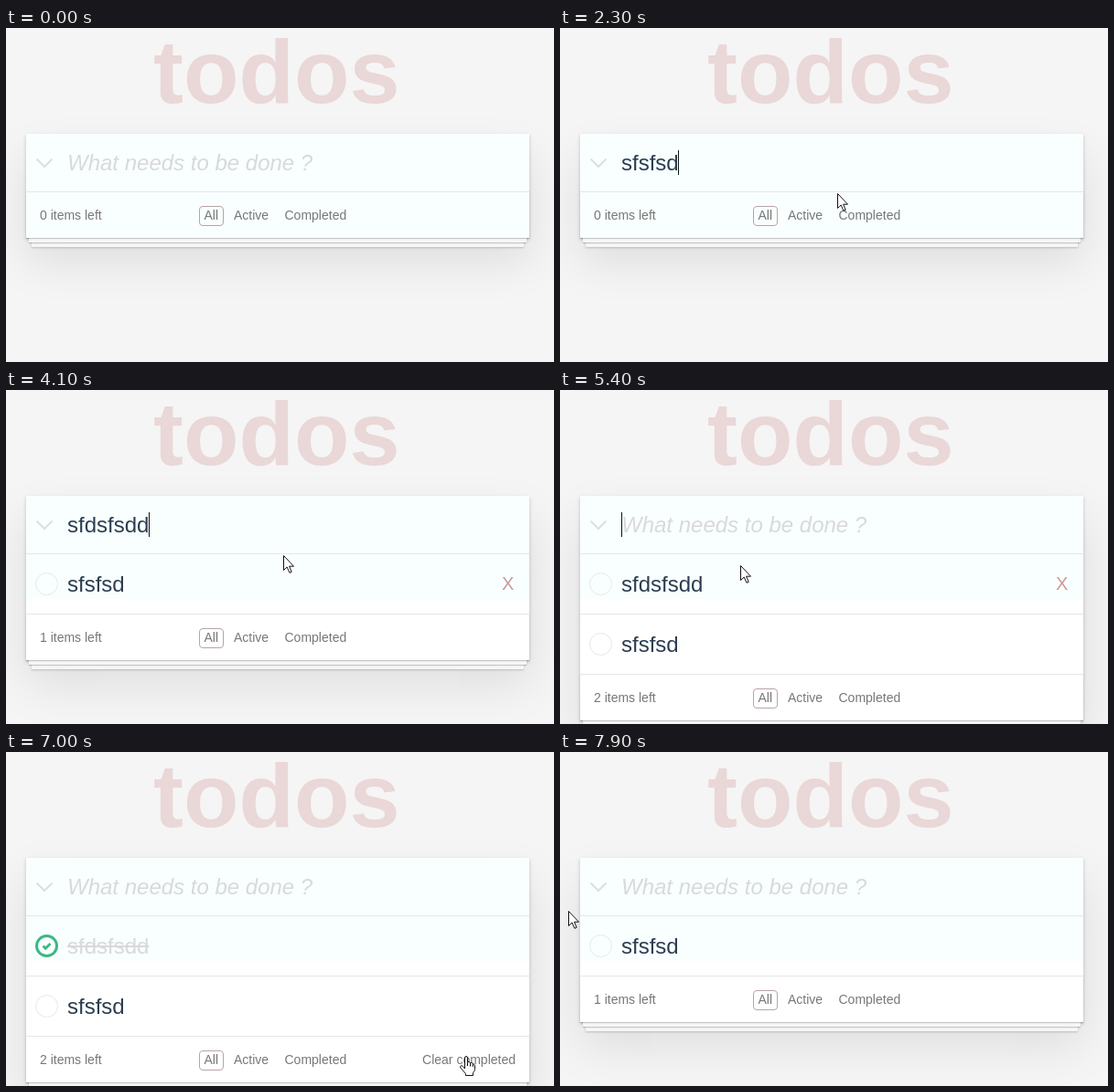
These frames come from a looping animation (599 px wide and 366 px high, 8 s). An HTML page:

```html
<!DOCTYPE html>
<html lang="en">
<head>
<meta charset="utf-8">
<title>todos</title>
<style>
html, body { margin: 0; width: 100%; height: 100%; overflow: hidden; background: #f5f5f5; }
#stage { position: relative; width: 599px; height: 366px; overflow: hidden; background: #f5f5f5;
  font: 14px "Liberation Sans", Arial, sans-serif; color: #777; }
#stage * { position: absolute; box-sizing: border-box; margin: 0; white-space: pre; }
#stage h1 { left: 161px; top: -9px; font-size: 99px; line-height: normal; color: rgba(175, 47, 47, .15); }
#card { left: 22px; top: 116px; width: 550px;
  background: linear-gradient(#f9ffff 114px, #fff 114px);
  box-shadow: 0 2px 4px rgba(0, 0, 0, .2), 0 25px 50px rgba(0, 0, 0, .1); }
#stack { left: 0; bottom: 0; width: 550px; height: 50px;
  box-shadow: 0 1px 1px rgba(0, 0, 0, .2), 0 8px 0 -3px #f6f6f6, 0 9px 1px -3px rgba(0, 0, 0, .2),
    0 16px 0 -6px #f6f6f6, 0 17px 2px -6px rgba(0, 0, 0, .2); }
.big { left: 45px; font-size: 24px; color: #2c3e50; }
#hint { top: 18px; font-style: italic; color: #d9d9d9; }
#typed { top: 18px; }
#caret { top: 18px; width: 1px; height: 27px; background: #111; }
#list { left: 0; top: 0; }
.row, #footer { left: 0; width: 550px; height: 66px; border-top: 1px solid #e6e6e6; }
.row .big { top: 19px; }
.kill { left: 520px; top: 21px; font-size: 20px; color: #cc9a9a; }
#footer { height: 51px; }
#footer span { top: 17px; }
#footer .on { left: 189px; top: 15px; width: 27px; height: 22px; border: 1px solid #b8a4a4; border-radius: 4px; }
svg { left: 0; top: 0; overflow: visible; fill: none; }
.row svg { left: 9px; top: 19px; }
</style>
</head>
<body>
<div id="stage">
  <h1>todos</h1>
  <div id="card">
    <div id="stack"></div>
    <svg width="550" height="64"><path d="M11.5 27.5 20 36 28.5 27.5" stroke="#dedede" stroke-width="2"/></svg>
    <div id="hint" class="big">What needs to be done ?</div>
    <div id="typed" class="big"></div>
    <div id="caret"></div>
    <div id="list"></div>
    <div id="footer">
      <span id="count" style="left:15px"></span>
      <i class="on"></i>
      <span style="left:194.5px">All</span>
      <span style="left:227px">Active</span>
      <span style="left:282.5px">Completed</span>
      <span id="clear" style="right:15px">Clear completed</span>
    </div>
  </div>
  <svg id="mouse" width="20" height="24" stroke="#111" stroke-linejoin="round">
    <path id="beam" d="M-3-8.5h2.5L0-8 .5-8.5H3M0-8V8M-3 8.5h2.5L0 8 .5 8.5H3"/>
    <path id="arrow" fill="#fff" d="M.5.5V16.5L4.2 13 7 19.3 9.2 18.3 6.6 12.2H11.5Z"/>
    <g id="hand">
      <path fill="#fff" d="M5.5 14V2.2Q5.5.5 7 .5T8.5 2.2V7.5Q9 6.3 10.3 6.6 11.4 6.8 11.5 8 12.2 7 13.4 7.5 14.3 7.9 14.3 9 15.2 8.6 15.9 9.4 16.5 10 16.5 11V14.5Q16.5 16.5 14.5 18.5V21.5H6.5V19.5L1 13.2Q0 11.8 1.2 10.9 2.3 10.3 3.4 11.4Z"/>
      <path d="M8.5 7.5V11M11.5 8V11.5M14.3 9V12"/>
    </g>
  </svg>
</div>
<script>
const LOOP = 8000, CHECK = 6200, CLEAR = 7300;
const $ = id => document.getElementById(id);

// time, x, y, kind
const mouse = [
  [0, 0, 0, ''],
  [200, 499, 151, 'beam'], [300, 420, 157, 'beam'], [400, 310, 160, 'beam'], [500, 230, 150, 'beam'],
  [600, 180, 136, 'beam'], [700, 162, 130, 'beam'], [800, 150, 142, 'beam'], [900, 144, 151, 'beam'],
  [1100, 235, 168, 'beam'], [1200, 303, 181, 'arrow'],
  [5400, 197, 192, 'arrow'], [5500, 130, 208, 'arrow'], [5600, 86, 213, 'arrow'],
  [5700, 58, 213, 'arrow'], [5800, 45, 212, 'arrow'], [5900, 42, 212, 'arrow'],
  [6400, 70, 219, 'arrow'], [6500, 160, 250, 'arrow'], [6600, 287, 290, 'arrow'],
  [6700, 420, 322, 'arrow'], [6800, 488, 332, 'hand'], [7000, 496, 333, 'hand'],
  [7300, 496, 333, 'arrow'], [7400, 495, 318, 'arrow'], [7500, 486, 275, 'arrow'],
  [7600, 465, 219, 'arrow'], [7700, 279, 202, 'arrow'], [7800, 88, 196, 'arrow'], [7900, 9, 174, 'arrow']
];

const typing = [
  [0, ''],
  [1400, 's'], [1700, 'sf'], [1800, 'sfs'], [1900, 'sfsf'], [2100, 'sfsfs'], [2300, 'sfsfsd'], [2700, ''],
  [3100, 's'], [3200, 'sf'], [3300, 'sfd'], [3400, 'sfds'], [3500, 'sfdsf'], [3900, 'sfdsfsd'],
  [4100, 'sfdsfsdd'], [4400, '']
];

const lists = [[0, []], [2700, ['sfsfsd']], [4400, ['sfdsfsdd', 'sfsfsd']], [CLEAR, ['sfsfsd']]];
const caret = [[0, 0], [900, 1], [4900, 0], [5400, 1], [5900, 0]];

const at = (table, t) => table.filter(step => step[0] <= t).pop();
const show = (el, on) => { el.style.visibility = on ? 'visible' : 'hidden'; };

const rows = [0, 1].map(i => {
  const el = document.createElement('div');
  el.className = 'row';
  el.style.top = 63 + 66 * i + 'px';
  el.innerHTML = '<svg width="27" height="27"><circle cx="13.5" cy="13.5"/>' +
    '<path d="M9.5 13.6 12.2 16.2 17.5 10.9" stroke="#3cb883" stroke-width="2.8"/></svg>' +
    '<span class="big"></span><span class="kill">X</span>';
  $('list').append(el);
  const [ring, tick, label, kill] = ['circle', 'path', '.big', '.kill'].map(q => el.querySelector(q));
  return { el, ring, tick, label, kill };
});

function fade(t) {
  const k = Math.min(1, Math.max(0, (t - CHECK) / 400));
  const mix = (a, b) => Math.round(a + (b - a) * k);
  return `rgb(${mix(44, 217)},${mix(62, 217)},${mix(80, 217)})`;
}

function drawRow(row, i, items, t, hover) {
  const done = i === 0 && t >= CHECK && t < CLEAR;
  row.el.style.display = i < items.length ? 'block' : 'none';
  row.label.textContent = items[i] || '';
  row.label.style.color = done ? fade(t) : '#2c3e50';
  row.label.style.textDecoration = done ? 'line-through' : 'none';
  row.ring.setAttribute('r', done ? 11 : 12);
  row.ring.setAttribute('stroke', done ? '#3cb883' : '#e8e8e8');
  row.ring.setAttribute('stroke-width', done ? 3 : 1);
  row.tick.style.display = done ? 'block' : 'none';
  row.kill.style.display = hover ? 'block' : 'none';
}

function draw(t) {
  const [, x, y, kind] = at(mouse, t);
  const text = at(typing, t)[1], items = at(lists, t)[1];
  const extra = 66 * items.length;

  $('card').style.height = 114 + extra + 'px';
  $('footer').style.top = 63 + extra + 'px';
  $('count').textContent = items.length + ' items left';
  show($('clear'), t >= CHECK && t < CLEAR);

  $('typed').textContent = text;
  show($('hint'), !text);
  show($('caret'), at(caret, t)[1]);
  $('caret').style.left = 45 + Math.floor($('typed').getBoundingClientRect().width) + 'px';

  // The new row only notices the pointer once it moves again.
  const still = t >= 4400 && t < 5400;
  const over = !still && x >= 22 && x < 572 ? Math.floor((y - 180) / 66) : -1;
  rows.forEach((row, i) => drawRow(row, i, items, t, i === over));

  $('mouse').style.transform = `translate(${x}px,${y}px)`;
  for (const k of ['beam', 'arrow', 'hand']) $(k).style.display = k === kind ? 'block' : 'none';
}

const start = performance.now();
function tick() {
  draw((performance.now() - start) % LOOP);
  requestAnimationFrame(tick);
}
tick();
</script>
</body>
</html>
```
